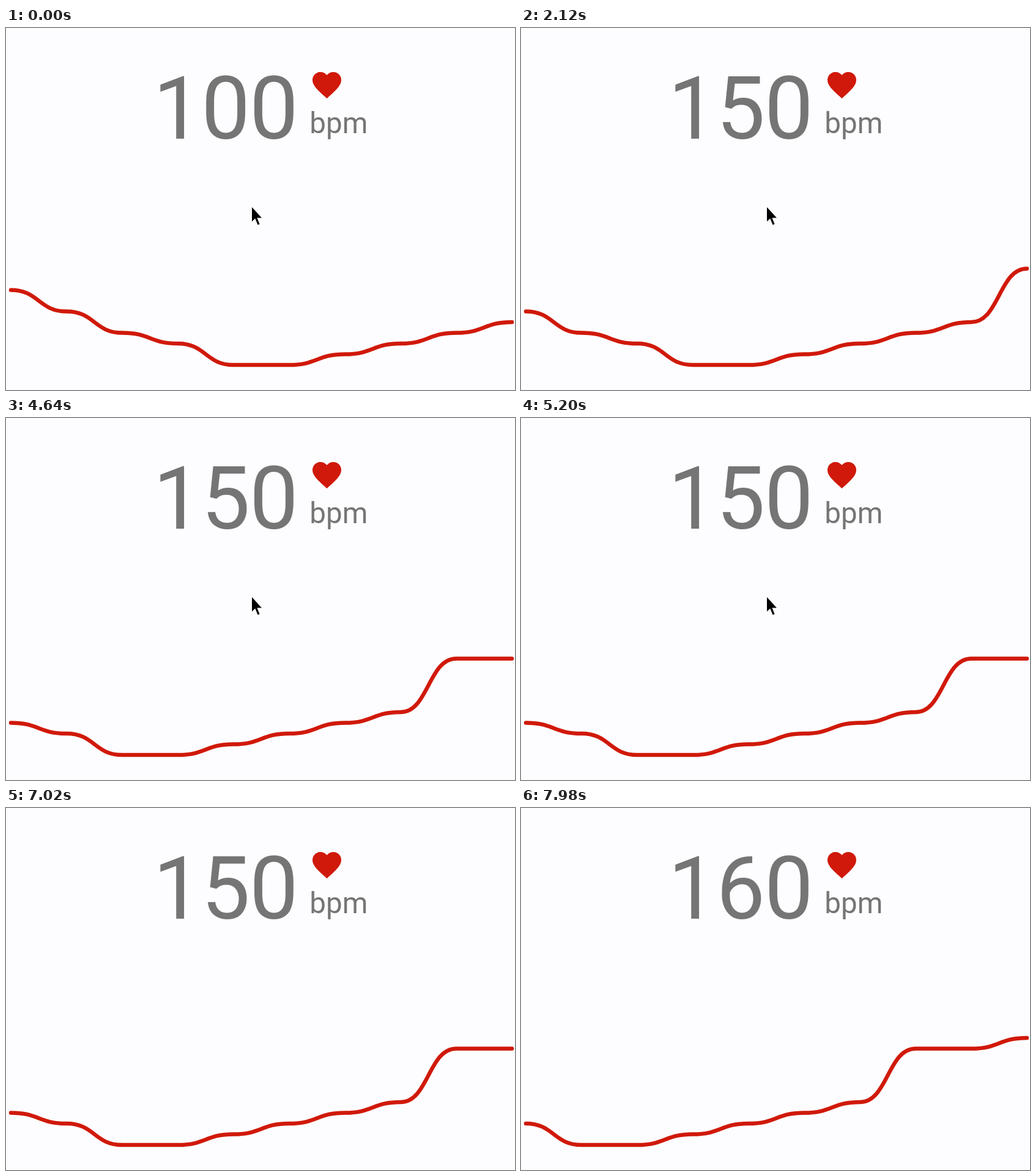
An HTML page for the animation above (8 s loop, 832 px wide and 592 px high).

```html
<!DOCTYPE html>
<html lang="en">
<head>
<meta charset="utf-8">
<title>Heart rate</title>
<style>
  html, body { margin: 0; width: 100%; height: 100%; overflow: hidden; background: #fdfdff; }
  svg { display: block; width: 832px; height: 592px; }
  text { font-family: Roboto, sans-serif; fill: #757575; }
  #rate { font-size: 142px; letter-spacing: -1px; }
  #unit { font-size: 47.5px; }
  #line { fill: none; stroke: #d0190a; stroke-width: 6.4; stroke-linecap: round; stroke-linejoin: round; }
  #heart { fill: #d0190a; }
  #cursor path { paint-order: stroke; }
</style>
</head>
<body>
<svg viewBox="0 0 832 592">
  <text id="rate" x="240.5" y="181">100</text>
  <text id="unit" x="496.3" y="172">bpm</text>
  <path id="heart" transform="translate(496.3 65) scale(2.35)"
    d="M12 21.35l-1.45-1.32C5.4 15.36 2 12.28 2 8.5 2 5.42 4.42 3 7.5 3c1.74 0 3.41.81 4.5 2.09C13.09 3.81 14.76 3 16.5 3 19.58 3 22 5.42 22 8.5c0 3.78-3.4 6.86-8.55 11.54z"/>
  <path id="line"/>
  <g id="cursor">
    <path d="M402 293V316.5L407.2 311.6L411.6 322L414.6 320.7L410.4 310.6H418Z"
      stroke="#fff" stroke-width="3.5"/>
  </g>
</svg>
<script>
  const LOOP = 8000;
  const POINTS = 10;
  const LEFT = 8;
  const STEP = 91;
  const CURSOR_HIDES = 6860;
  const LINE_LAG = 20; // the chart redraws just after the number
  const READINGS = [1660, 4440, 7220];
  const RATES = [130, 110, 90, 80, 60, 60, 70, 80, 90, 100, 150, 150, 160];

  const byId = id => document.getElementById(id);
  const rate = byId('rate'), line = byId('line'), cursor = byId('cursor');
  const readingsAt = t => READINGS.filter(start => t >= start).length;
  const yOf = bpm => 656 - 1.75 * bpm;

  function curve(first) {
    return RATES.slice(first, first + POINTS).map((bpm, i, shown) => {
      const x = LEFT + i * STEP, y = yOf(bpm);
      if (!i) return `M${x} ${y}`;
      const mid = x - STEP / 2;
      return `C${mid} ${yOf(shown[i - 1])} ${mid} ${y} ${x} ${y}`;
    }).join('');
  }

  function draw(t) {
    rate.textContent = RATES[POINTS - 1 + readingsAt(t)];
    line.setAttribute('d', curve(readingsAt(t - LINE_LAG)));
    cursor.style.display = t < CURSOR_HIDES ? '' : 'none';
  }

  const begin = performance.now();
  function tick() {
    draw((performance.now() - begin) % LOOP);
    requestAnimationFrame(tick);
  }
  draw(0);
  requestAnimationFrame(tick);
</script>
</body>
</html>
```
